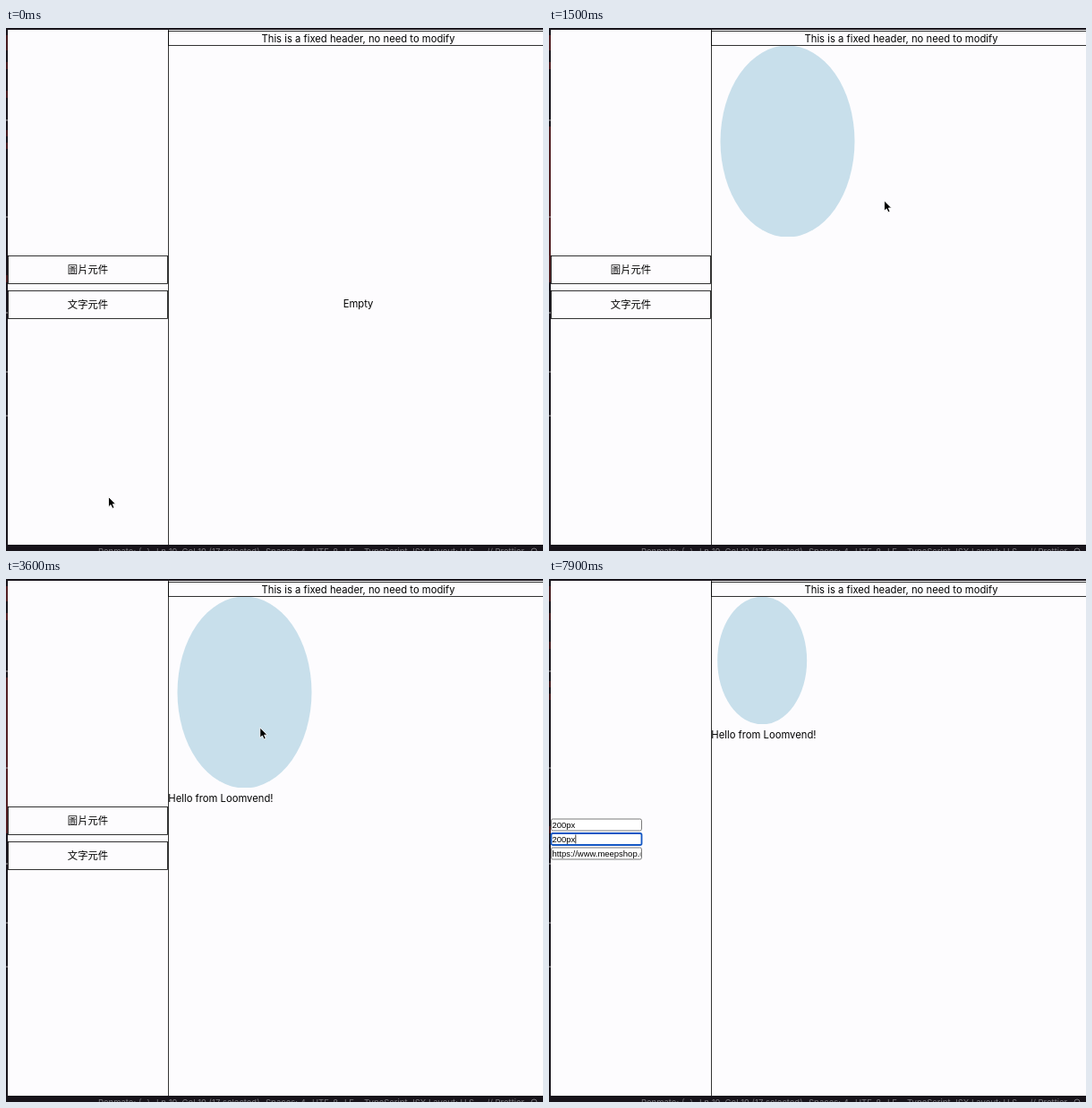
An HTML page for the animation above (8 s loop, 600x584 px).

```html
<!DOCTYPE html>
<html lang="zh-Hant">
<head>
<meta charset="utf-8">
<title>Page editor</title>
<style>
html, body { margin: 0; width: 100%; height: 100%; overflow: hidden; background: #17131a; }
#stage { display: block; }
text { font: 11.25px Inter, "Noto Sans CJK TC", "Noto Sans CJK", sans-serif; }
.cjk { font: 500 11.36px "Noto Sans CJK TC", "Noto Sans CJK", sans-serif; }
.field text { font: 9.47px "Liberation Sans", sans-serif; }
.mid { text-anchor: middle; }
.box { fill: none; stroke: currentColor; stroke-width: .8; }
#page { fill: currentColor; }
</style>
</head>
<body>
<svg id="stage" width="600" height="584" viewBox="0 0 600 584">
  <defs>
    <clipPath id="inner"><rect x="3" y="0" width="99.5" height="14"/></clipPath>
  </defs>
  <rect width="600" height="584" fill="#17131a"/>
  <path id="stripIdle" fill="#45191d" d="M0 8h2v17h-2zM0 38h2v8h-2zM0 70h2v8h-2zM0 114h2v7h-2zM0 128h2v7h-2zM0 276h2v8h-2z"/>
  <path id="stripBusy" fill="#521e22" d="M0 8h2v17h-2zM0 38h2v8h-2zM0 110h2v174h-2z"/>
  <path d="M0 103h2M0 211h2M0 318h2M0 384h2M0 433h2" stroke="#aaa6a8"/>
  <text y="588" fill="#77757a" style="font-size:9.5px"><tspan x="103">Penmate: {..}</tspan><tspan x="168">Ln 19, Col 19 (17 selected)</tspan><tspan x="290">Spaces: 4</tspan><tspan x="342">UTF-8</tspan><tspan x="378">LF</tspan><tspan x="400">TypeScript JSX</tspan><tspan x="472">Layout: U.S.</tspan><tspan x="537">// Prettier</tspan></text>
  <circle cx="590" cy="584" r="3" fill="none" stroke="#77757a"/>

  <rect x="2" y="2" width="179" height="575" fill="#fdfcfe"/>
  <rect id="canvas" x="181" y="2" width="419" height="575"/>
  <g id="page">
    <path class="box" d="M181.5 2V577"/>
    <rect class="box" x="181.5" y="3.5" width="424" height="16"/>
    <text class="mid" x="393.5" y="16">This is a fixed header, no need to modify</text>
    <text class="mid" id="empty" x="393.5" y="311.5">Empty</text>
    <text id="hello" x="181.3">Hello from Loomvend!</text>
  </g>
  <svg id="pic" x="181.5" y="20" viewBox="0 0 213 237" preserveAspectRatio="xMidYMid slice">
    <ellipse id="figure" cx="85" cy="118.5" rx="75" ry="107"/>
  </svg>

  <g id="parts"></g>
  <g id="fields"></g>
  <g id="ghost"></g>

  <path id="arrow" d="M0 0V11.4L2.6 9L4.4 13L6.5 12.1L4.8 8.2H8.2Z" fill="#000" stroke="#fff" stroke-width=".9"/>
  <path id="beam" d="M-2.5 -5.5Q0 -5.5 0 -4Q0 -5.5 2.5 -5.5M0 -4V4M-2.5 5.5Q0 5.5 0 4Q0 5.5 2.5 5.5M-1.2 1.5H1.2" fill="none" stroke="#222"/>
</svg>
<script>
const LOOP = 8000, STEP = 100, SCALE = 0.71;
const $ = id => document.getElementById(id);
const show = (el, on) => el.setAttribute("display", on ? "inline" : "none");
const put = (el, attrs) => { for (const k in attrs) el.setAttribute(k, attrs[k]); };
const place = (el, x, y) => el.setAttribute("transform", `translate(${x} ${y})`);

// Draggable parts and the two drags: when held, when dropped, when applied
const parts = [{ label: "圖片元件", y: 254 }, { label: "文字元件", y: 293 }];
const drags = [
  { part: 0, start: 600, drop: 1200, done: 1400, grab: [108, 268] },
  { part: 1, start: 2100, drop: 2900, done: 3100, grab: [119, 303] }
];
const partMarkup = label =>
  `<rect class="box" x="2.5" y=".5" width="178" height="31"/>` +
  `<text class="mid cjk" x="91.5" y="20.3">${label}</text>`;
$("parts").innerHTML = parts.map(p =>
  `<g transform="translate(0 ${p.y})">${partMarkup(p.label)}</g>`).join("");

// Cursor path: time, x, y
const path = [
  [0, 114.5, 523.5], [500, 108, 268], [600, 108, 268], [1000, 395, 184],
  [1400, 395, 184], [2000, 119, 303], [2100, 119, 303], [2300, 187, 263],
  [2800, 279, 271], [3100, 279, 271], [3800, 285, 140], [4000, 285, 140],
  [4900, 53.5, 274]
];
function cursorAt(t) {
  const i = path.findIndex(p => p[0] > t);
  if (i < 0) return path[path.length - 1].slice(1);
  const [t0, x0, y0] = path[i - 1], [t1, x1, y1] = path[i];
  const u = (t - t0) / (t1 - t0), e = u * u * (3 - 2 * u);
  return [x0 + (x1 - x0) * e, y0 + (y1 - y0) * e];
}

const OPEN = 4000;
const inputs = [
  { value: "300px", focus: 5200, blur: 6500, keys: [6000, 6100, 6200, 6300, 6400] },
  { value: "300px", focus: 6500, blur: LOOP, keys: [7000, 7100, 7300, 7500, 7600] },
  { value: "https://www.meepshop.com", focus: LOOP, blur: LOOP, keys: [] }
];
$("fields").innerHTML = inputs.map((f, i) =>
  `<g class="field" transform="translate(0 ${267.5 + i * 16})">
    <rect x="2.5" y=".5" width="101" height="13" rx="1.8" fill="#fff"/>
    <rect x="3.2" y="2" width="26" height="10.5" fill="#a8cdf6"/>
    <g clip-path="url(#inner)"><text x="3.4" y="10.4"></text></g>
    <path d="M29.8 2V12" stroke="#000" stroke-width=".8"/>
  </g>`).join("");
const fieldEls = [...$("fields").children].map(g => ({
  frame: g.children[0], mark: g.children[1], text: g.querySelector("text"), caret: g.children[3]
}));

function drawField(f, el, t) {
  const typed = f.keys.filter(k => t >= k).length;
  const focused = t >= f.focus && t < f.blur;
  put(el.frame, focused
    ? { stroke: "#1558c4", "stroke-width": 1.8 }
    : { stroke: "#6c6c6c", "stroke-width": 0.9 });
  el.text.textContent = typed ? "200px".slice(0, typed) : f.value;
  show(el.mark, focused && !typed);
  show(el.caret, focused && typed);
  if (typed) place(el.caret, (typed - 5) * 5.2, 0);
}

// A size only takes effect once its unit is complete
const sizeOf = (f, t) => (t >= f.keys[4] ? 200 : 300) * SCALE;

function draw(t) {
  const [x, y] = cursorAt(t);
  const drag = drags.find(d => t >= d.start && t < d.done);
  const over = !!drag && x > 188;
  const w = sizeOf(inputs[0], t), h = sizeOf(inputs[1], t);

  const busy = t >= 700 && t < 4500;
  show($("stripIdle"), !busy);
  show($("stripBusy"), busy);

  $("canvas").setAttribute("fill", over ? "#b3d5e0" : "#fdfcfe");
  $("page").setAttribute("color", over ? "#9ba3a9" : "#000");
  show($("empty"), t < drags[0].done);
  show($("pic"), t >= drags[0].done);
  put($("pic"), { width: w, height: h });
  $("figure").setAttribute("fill", over ? "#ebf1f8" : "#c8dfeb");
  show($("hello"), t >= drags[1].done);
  $("hello").setAttribute("y", 35.5 + h);

  const editing = t >= OPEN;
  show($("parts"), !editing);
  [...$("parts").children].forEach((g, i) =>
    g.setAttribute("opacity", drag && drag.part === i ? 0.55 : 1));
  show($("fields"), editing);
  inputs.forEach((f, i) => drawField(f, fieldEls[i], t));

  const held = drag && t < drag.drop;
  show($("ghost"), held);
  if (held) {
    const p = parts[drag.part];
    $("ghost").innerHTML = partMarkup(p.label);
    place($("ghost"), x - drag.grab[0], p.y + y - drag.grab[1]);
  }

  const typing = t >= inputs[0].keys[0];
  const inField = editing && x < 104 && y > 267;
  show($("arrow"), !inField && !typing);
  show($("beam"), inField && !typing);
  place($("arrow"), x, y);
  place($("beam"), x, y);
}

const begin = performance.now();
function tick() {
  const t = (performance.now() - begin) % LOOP;
  draw(Math.floor(t / STEP) * STEP);
  requestAnimationFrame(tick);
}
tick();
</script>
</body>
</html>
```
